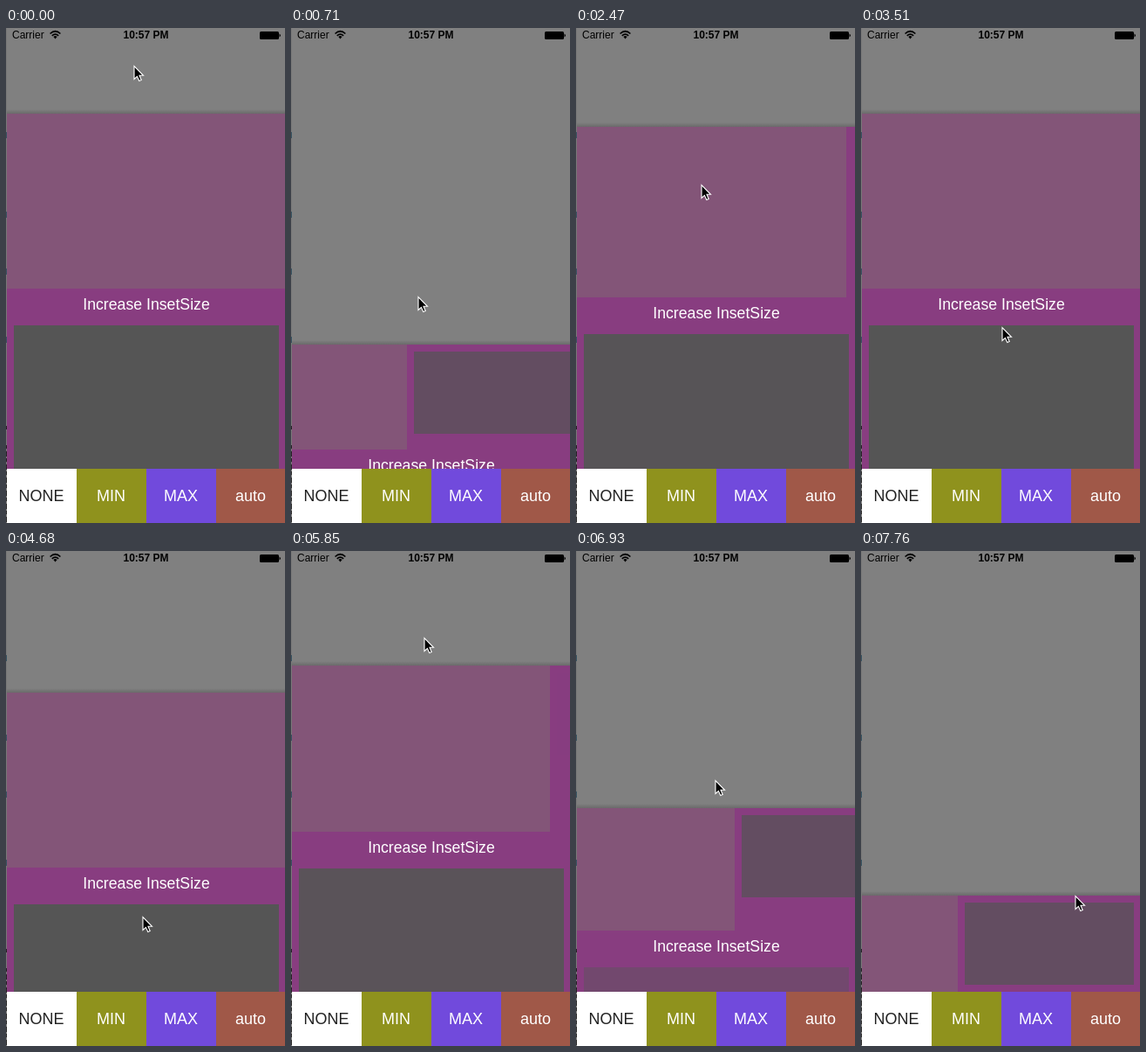
Recreate the animation shown at these times as an HTML page. Size 320 by 566 pixels, loop 8 s.

```html
<!DOCTYPE html>
<html lang="en">
<head>
<meta charset="utf-8">
<style>
html, body { margin: 0; width: 100%; height: 100%; overflow: hidden; background: #808080; }
svg { display: block; width: 320px; height: 566px; font: 18px "Liberation Sans", Arial, sans-serif; }
.status { font-size: 12px; }
.label { font-size: 17.7px; fill: #fff; }
.mid { text-anchor: middle; }
</style>
</head>
<body>
<svg viewBox="0 0 320 566">
  <defs>
    <linearGradient id="shade" x2="0" y2="1">
      <stop stop-color="#000" stop-opacity="0"/>
      <stop offset="1" stop-color="#000" stop-opacity=".17"/>
    </linearGradient>
  </defs>
  <rect width="320" height="566" fill="#808080"/>
  <rect width="1" height="566" fill="#777"/>

  <g class="status">
    <text x="7" y="12">Carrier</text>
    <text x="160.5" y="12" class="mid" font-weight="bold">10:57 PM</text>
    <path d="M50.6 6.5Q56.5 1 62.4 6.5M52.8 8.8Q56.500 5.400 60.200 8.800" fill="none" stroke="#000" stroke-width="1.7"/>
    <path d="M54.4 10Q56.5 8.200 58.600 10L56.500 12.400Z"/>
    <rect x="291" y="4" width="22" height="9" rx="1.5"/>
    <path d="M313.500 6.500Q316.500 8.500 313.500 10.500Z"/>
  </g>

  <g id="panel">
    <rect x="1" y="-5" width="319" height="5" fill="url(#shade)"/>
    <rect x="1" width="319" height="480" fill="#883d80"/>
    <rect id="video" x="1" fill="#835578"/>
    <rect id="side" y="8" width="194" height="94" fill="#555"/>
    <g id="detail">
      <text x="161" y="23.500" class="label mid">Increase InsetSize</text>
      <rect id="body" x="9" y="42" width="304" height="400" fill="#555"/>
    </g>
  </g>

  <g id="buttons" class="mid"></g>
  <path d="M.5 119v7M.5 210v7M.5 275v7M.5 353v7" stroke="#34505f"/>
  <path d="M.5 455v4M.5 477v89" stroke="#222" stroke-dasharray="4 3 6 2"/>
  <path id="cursor" d="M0 .5V15.500L3.400 12.300 5.800 17.500 8.200 16.500 6 11.300H10.500Z" stroke="#fff" stroke-width="1.100"/>
</svg>
<script>
const LOOP = 8000, TOP = 98, LOW = 394;
const $ = id => document.getElementById(id);
const set = (id, attrs) => {
  for (const k in attrs) $(id).setAttribute(k, attrs[k]);
};
const clamp = (v, lo, hi) => Math.min(hi, Math.max(lo, v));

// pointer moves: from time, to time, x, y, whether the panel is dragged along
const moves = [
  [390, 860, 145, 430, true],
  [860, 1220, 142, 202, true],
  [1300, 1560, 142, 315, true],
  [1560, 1780, 142, 460, true],
  [1970, 2500, 144, 163, true],
  [2500, 2810, 170, 386, false],
  [2830, 3210, 163, 311, false],
  [3410, 3550, 162, 354, false],
  [3550, 3970, 157, 419, true],
  [4680, 5260, 152, 53, true],
  [5690, 5735, 152, 66, false],
  [5735, 5850, 153, 99, true],
  [5850, 6410, 157, 215, true],
  [6410, 6930, 160, 262, true],
  [7250, 7760, 246, 394, true]
];

function pose(t) {
  let x = 147, y = 43, top = TOP;
  for (const [from, to, toX, toY, drag] of moves) {
    const f = clamp((t - from) / (to - from), 0, 1), dy = (toY - y) * f;
    if (f === 0) break;
    x += (toX - x) * f;
    y += dy;
    if (drag) top = clamp(top + dy, TOP, LOW);
  }
  return { x, y, top };
}

$("buttons").innerHTML = [
  ["NONE", "#fff", "#222"], ["MIN", "#8f921d", "#fff"],
  ["MAX", "#714adc", "#fff"], ["auto", "#a05848", "#fff"]
].map(([label, back, ink], i) =>
  `<rect x="${1 + 80 * i}" y="504" width="80" height="62" fill="${back}"/>
   <text x="${40.5 + 80 * i}" y="541" fill="${ink}">${label}</text>`).join("");

function draw(t) {
  const { x, y, top } = pose(t);
  // the panel keeps its full size while the inset is enlarged
  const p = t > 3400 && t < 5300 ? 0 : (top - TOP) / (LOW - TOP);
  const width = Math.round(320 - 210 * p), height = Math.round(200 - 90 * p);
  set("panel", { transform: `translate(0 ${Math.round(top)})` });
  set("video", { width, height });
  set("side", { x: width + 9, opacity: 0.7 * clamp((p - 0.11) * 2.2, 0, 1) });
  set("detail", { transform: `translate(0 ${height})` });
  set("body", { opacity: 1 - 0.85 * p });
  set("cursor", { transform: `translate(${Math.round(x)} ${Math.round(y)})` });
}

const start = performance.now();
function tick() {
  draw((performance.now() - start) % LOOP);
  requestAnimationFrame(tick);
}
tick();
</script>
</body>
</html>
```
